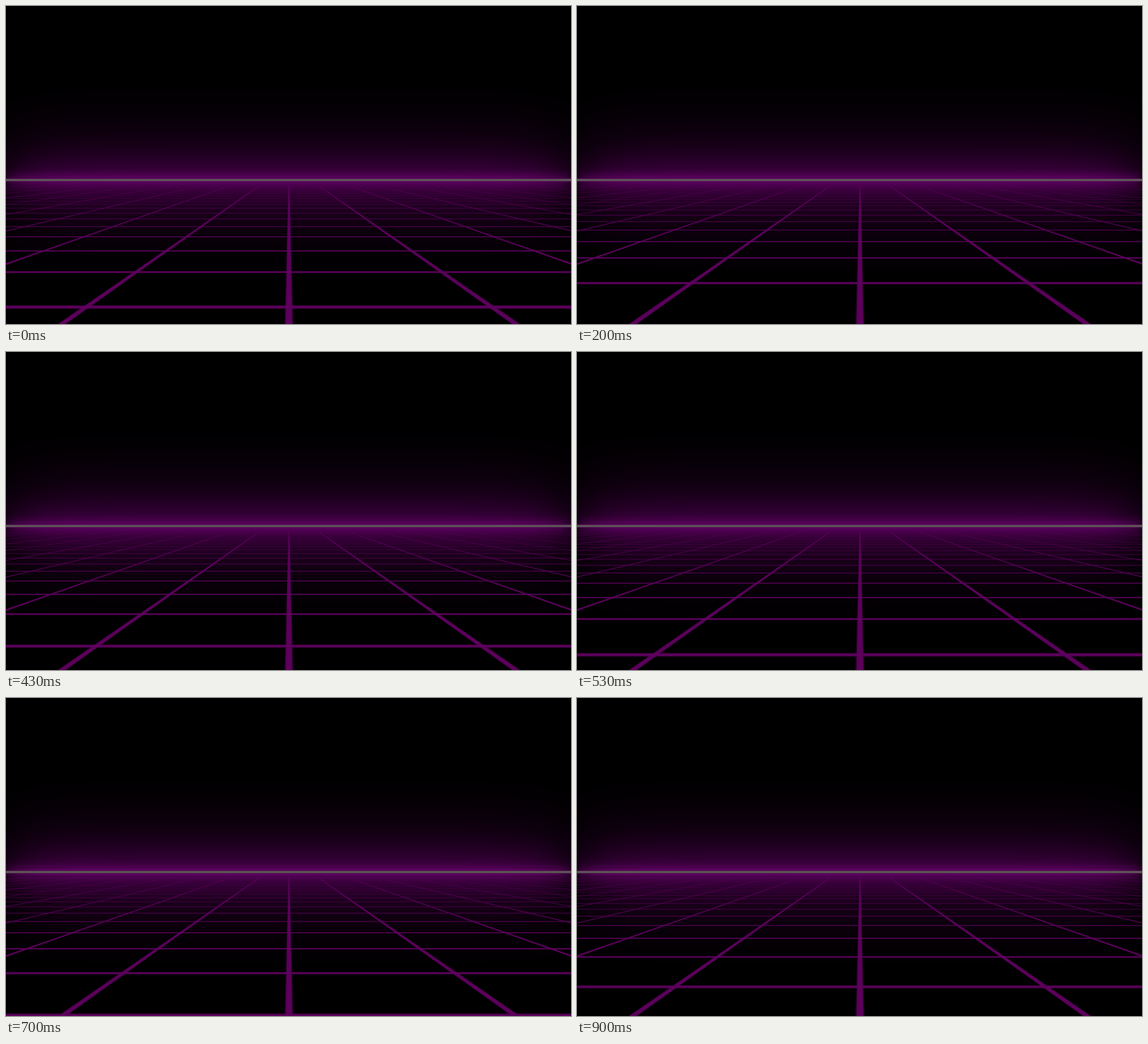
An HTML page with a canvas that plays this animation: 998x561 px, repeating every 970 ms.

```html
<!DOCTYPE html>
<html lang="en">
<head>
<meta charset="utf-8">
<title>Neon grid</title>
<style>
html, body { margin: 0; height: 100%; overflow: hidden; background: #000; }
canvas { display: block; }
</style>
</head>
<body>
<canvas id="stage" width="998" height="561"></canvas>
<script>
const ctx = document.getElementById('stage').getContext('2d');
const W = 998, H = 561, LOOP = 970;
const CENTER = 499.8, VANISH = 280.5, DEPTH = 765, FAR = 317, HORIZON = 307;
const COLUMN = 1.43;

// Line profile, from soft rim to solid core: opacity, column width, row width
const STROKES = [[0.2, 0.062, 0.092], [0.45, 0.051, 0.07], [1, 0.04, 0.05]];

// Rows travelled after a number of animation steps
const TRAVEL = [[0, 0], [4, 0.38], [7, 0.646], [9, 0.843], [12, 1.133], [14, 1.319], [18, 1.711]];

// Horizon glow: strength and spread of each layer
const GLOW = [[34, 9], [22, 28], [34, 63]];

function makeGlow() {
  const image = ctx.createImageData(W, H);
  const edge = (x, s) => 1 / (1 + Math.exp(0.4 - 1.7 * x / s));
  for (let y = 0; y < H; y++) {
    const falloff = GLOW.map(([a, s]) => a * Math.exp(-((y + 0.5 - HORIZON) ** 2) / (2 * s * s)));
    for (let x = 0; x < W; x++) {
      const level = GLOW.reduce((sum, [, s], i) => sum + falloff[i] * edge(x, s) * edge(W - x, s), 0);
      const p = (y * W + x) * 4;
      image.data[p] = level;
      image.data[p + 2] = level * 1.04;
      image.data[p + 3] = 255;
    }
  }
  return image;
}

function travelAt(step) {
  const i = Math.max(1, TRAVEL.findIndex(([s]) => s >= step));
  const [s0, d0] = TRAVEL[i - 1], [s1, d1] = TRAVEL[i];
  return d0 + (d1 - d0) * (step - s0) / (s1 - s0);
}

function drawColumns(width) {
  const top = FAR - VANISH, bottom = H - VANISH;
  for (let i = -14; i <= 14; i++) {
    const left = i * COLUMN - width / 2, right = left + width;
    ctx.beginPath();
    ctx.moveTo(CENTER + left * top, FAR);
    ctx.lineTo(CENTER + right * top, FAR);
    ctx.lineTo(CENTER + right * bottom, H);
    ctx.lineTo(CENTER + left * bottom, H);
    ctx.fill();
  }
}

function drawRows(width, travel) {
  const first = 2 + (1.056 - travel % 1) % 1;
  for (let z = first; z < DEPTH / (FAR - VANISH); z++) {
    const y = VANISH + DEPTH / z;
    const thickness = width * DEPTH / (z * z);
    ctx.fillRect(0, y - thickness / 2 + 0.3, W, thickness);
  }
}

const glow = makeGlow();

function draw(now) {
  // Steps alternate between 30 and 70 ms; the last one holds until the loop restarts
  const t = now % LOOP;
  const step = Math.min(18, 2 * Math.floor(t / 100) + (t % 100 >= 30 ? 1 : 0));
  const travel = travelAt(step);

  ctx.putImageData(glow, 0, 0);
  ctx.fillStyle = '#5c005c';
  for (const [alpha, columnWidth, rowWidth] of STROKES) {
    ctx.globalAlpha = alpha;
    drawColumns(columnWidth);
    drawRows(rowWidth, travel);
  }
  ctx.globalAlpha = 1;
  ctx.fillStyle = '#60185c';
  ctx.fillRect(0, 304.5, W, 5);
  ctx.fillStyle = '#5a5c55';
  ctx.fillRect(0, 305.4, W, 3.2);
}

let start;
function tick(now) {
  start ??= now;
  draw(now - start);
  requestAnimationFrame(tick);
}
requestAnimationFrame(tick);
</script>
</body>
</html>
```
